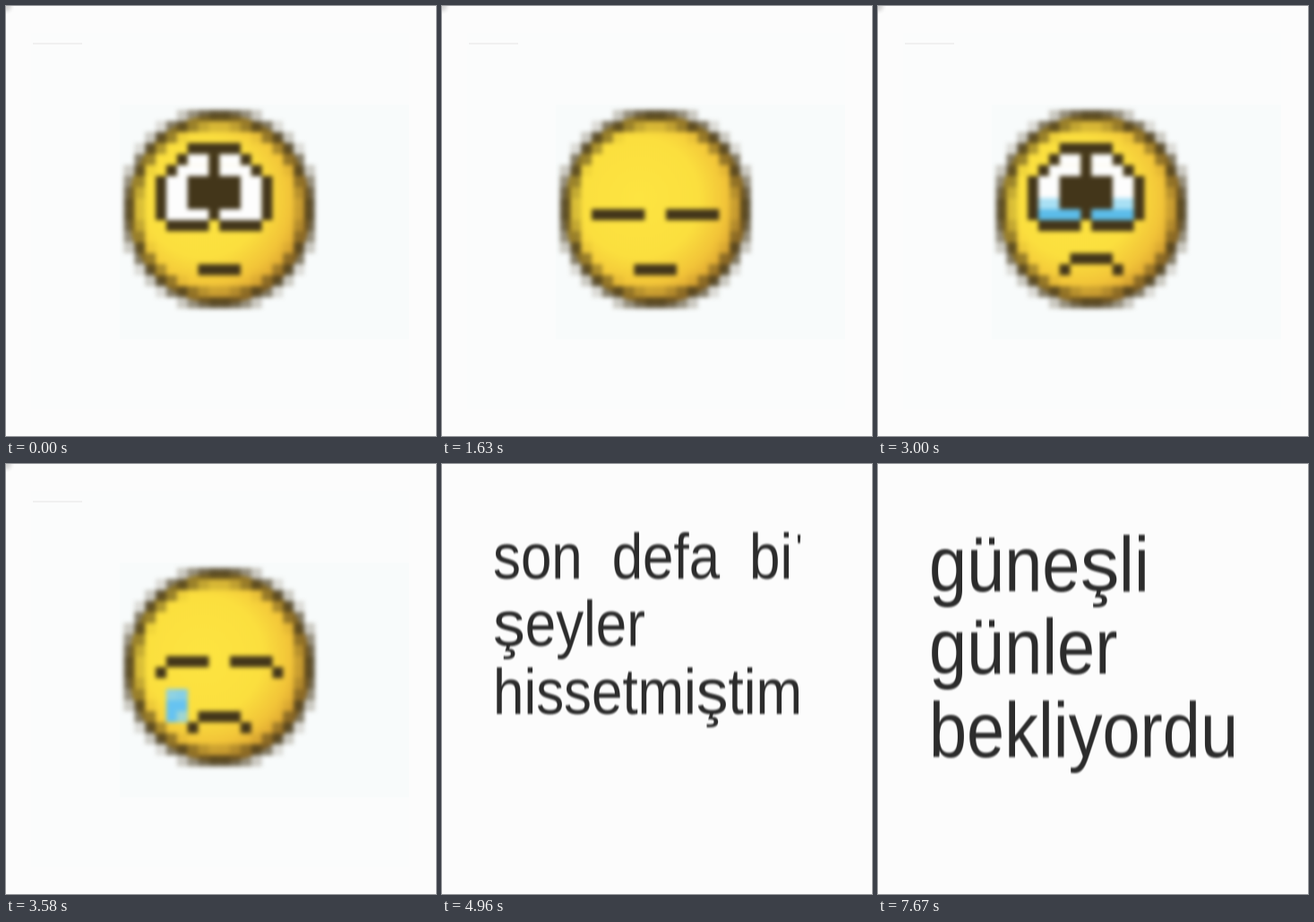
Write an HTML page that moves like this. It is 480 px wide and 480 px high and loops after 8000 ms.

```html
<!DOCTYPE html>
<html lang="tr">
<head>
<meta charset="utf-8">
<style>
  html, body { margin: 0; width: 100%; height: 100%; overflow: hidden; background: #fcfcfc; }
  svg { position: absolute; left: 0; top: 0; width: 480px; height: 480px; }
  #words {
    --narrow: .865;
    position: absolute; left: 57px; top: 66px; width: calc(345px / var(--narrow));
    transform: scaleX(var(--narrow)); transform-origin: 0 0;
    font-family: "Liberation Sans", Arial, sans-serif; line-height: 1.055;
    text-align: justify; color: #2c2c2c; filter: blur(.9px);
  }
  .word { white-space: nowrap; }
  /* The cedilla letter comes from the regular, wider face */
  .wide {
    display: inline-block; transform: scaleX(calc(1 / var(--narrow)));
    transform-origin: 0 0; margin-right: .078em;
  }
  .mark { position: relative; top: -.46em; padding-left: .1em; font-size: .6em; }
</style>
</head>
<body>
<svg id="scene" viewBox="0 0 480 480">
  <defs>
    <filter id="soft" x="-10%" y="-10%" width="120%" height="120%" color-interpolation-filters="sRGB">
      <feGaussianBlur stdDeviation="2.5"/>
    </filter>
    <filter id="haze" x="-20%" y="-20%" width="140%" height="140%">
      <feGaussianBlur stdDeviation="2"/>
    </filter>
    <radialGradient id="skin" gradientUnits="userSpaceOnUse" cx="220" cy="214" r="128">
      <stop offset="0" stop-color="#fde441"/>
      <stop offset=".52" stop-color="#fbdf3e"/>
      <stop offset=".76" stop-color="#f2c438"/>
      <stop offset="1" stop-color="#cf922d"/>
    </radialGradient>
  </defs>
  <rect x="28" y="30" width="422" height="420" fill="#fbfcfc"/>
  <rect x="127" y="110" width="323" height="262" fill="#f8fbfb"/>
  <rect x="30" y="41.5" width="55" height="1" fill="#e6e6e6"/>
  <circle cx="0" cy="0" r="6" fill="#d4d4d4" filter="url(#haze)"/>
  <g filter="url(#soft)">
    <ellipse cx="238.2" cy="226.7" rx="102" ry="106" fill="url(#skin)"/>
    <g id="rim"></g>
    <g id="features"></g>
  </g>
</svg>
<div id="words"></div>
<script>
const LOOP = 8000;
const CELL_W = 11.85, CELL_H = 12.3, LEFT = 131.5, TOP = 116;
const INK = '#43361a', WHITE = '#fdfdfd', PALE = '#a9e0f4', BLUE = '#5bbce9';
const $ = id => document.getElementById(id);

// A block of sprite cells
const cells = (col, row, w = 1, h = 1, fill = INK, opacity = 1) =>
  `<rect x="${LEFT + col * CELL_W}" y="${TOP + row * CELL_H}" width="${w * CELL_W + .1}" ` +
  `height="${h * CELL_H + .1}" fill="${fill}" opacity="${opacity}"/>`;

// The same block on both sides of the open eyes' axis
const pair = (col, row, w, h, fill) =>
  cells(col, row, w, h, fill) + cells(17 - col - w, row, w, h, fill);

function rim() {
  let out = '';
  for (let r = 0; r < 18; r++)
    for (let c = 0; c < 18; c++) {
      const d = Math.hypot(c - 8.5, r - 8.5);
      const a = Math.min(1, 1.08 - Math.abs(d - 8.4));
      if (a > 0) out += cells(c, r, 1, 1, '#4a3c1c', (a * .9).toFixed(2));
    }
  return out;
}

function openEyes(water) {
  return pair(6, 4, 2, 1, WHITE) + pair(5, 5, 3, 1, WHITE) + pair(4, 6, 4, 4, WHITE) +
    (water > 1 ? pair(4, 8, 2, 1, PALE) : '') +
    (water > 0 ? pair(4, 9, 4, 1, BLUE) : '') +
    cells(6, 3, 5) + pair(5, 4, 1, 1) + pair(4, 5, 1, 1) + pair(3, 6, 1, 4) +
    cells(8, 4, 1, 6) + cells(6, 6, 5, 3) + pair(4, 10, 4, 1);
}

const closedEyes = () => cells(3, 9, 5) + cells(10, 9, 5);
const sadClosedEyes = () =>
  cells(4, 8, 4) + cells(3, 9) + cells(10, 8, 4) + cells(14, 9);
const mouth = sad => sad ? cells(7, 13, 4) + cells(6, 14) + cells(11, 14) : cells(7, 14, 4);

const tear = row => cells(4, row, 2, 3, '#66c3f1') +
  cells(4, row, 1, 1, '#8fd2e2') + cells(5, row, 1, 1, '#86cfe6') +
  cells(5, row + 2, 1, 1, '#9fd6d2');

// Face poses: start time and drawing
const poses = [
  [0, () => openEyes(0) + mouth(false)],
  [620, () => closedEyes() + mouth(false)],
  [790, () => openEyes(0) + mouth(false)],
  [1540, () => closedEyes() + mouth(false)],
  [1710, () => openEyes(0) + mouth(false)],
  [1960, () => openEyes(0) + mouth(true)],
  [2120, () => openEyes(1) + mouth(true)],
  [2290, () => openEyes(2) + mouth(true)],
  [3130, () => sadClosedEyes() + mouth(true)],
  [3380, () => sadClosedEyes() + mouth(true) + tear(10)],
  [3520, () => sadClosedEyes() + mouth(true) + tear(11)],
  [3640, () => sadClosedEyes() + mouth(true) + tear(12)]
];

// Captions: start time, font size, text
const captions = [
  [3710, 160, "son"],
  [4040, 160, "son defa"],
  [4420, 122, "son defa bi'"],
  [4690, 110, "son defa bi' şeyler"],
  [4960, 71.5, "son defa bi' şeyler hissetmiştim"],
  [5750, 71.5, "son defa bi' şeyler hissetmiştim öyleydi"],
  [6750, 122.5, "güneşli"],
  [7250, 122.5, "güneşli günler"],
  [7670, 87.5, "güneşli günler bekliyordu"]
];

const wordHtml = word => '<span class="word">' + word
  .replace(/ş/g, '<span class="wide">ş</span>')
  .replace(/'/g, '<span class="mark">\'</span>') + '</span>';

const current = (list, t) => list.filter(item => item[0] <= t).pop();
let shown = null;

function render(t) {
  const caption = current(captions, t);
  const next = caption || current(poses, t);
  if (next === shown) return;
  shown = next;
  $('scene').style.display = caption ? 'none' : 'block';
  $('words').style.display = caption ? 'block' : 'none';
  if (caption) {
    $('words').style.fontSize = caption[1] + 'px';
    $('words').innerHTML = caption[2].split(' ').map(wordHtml).join(' ');
  } else {
    $('features').innerHTML = next[1]();
  }
}

$('rim').innerHTML = rim();
const start = performance.now();
function tick() {
  render((performance.now() - start) % LOOP);
  requestAnimationFrame(tick);
}
tick();
</script>
</body>
</html>
```
